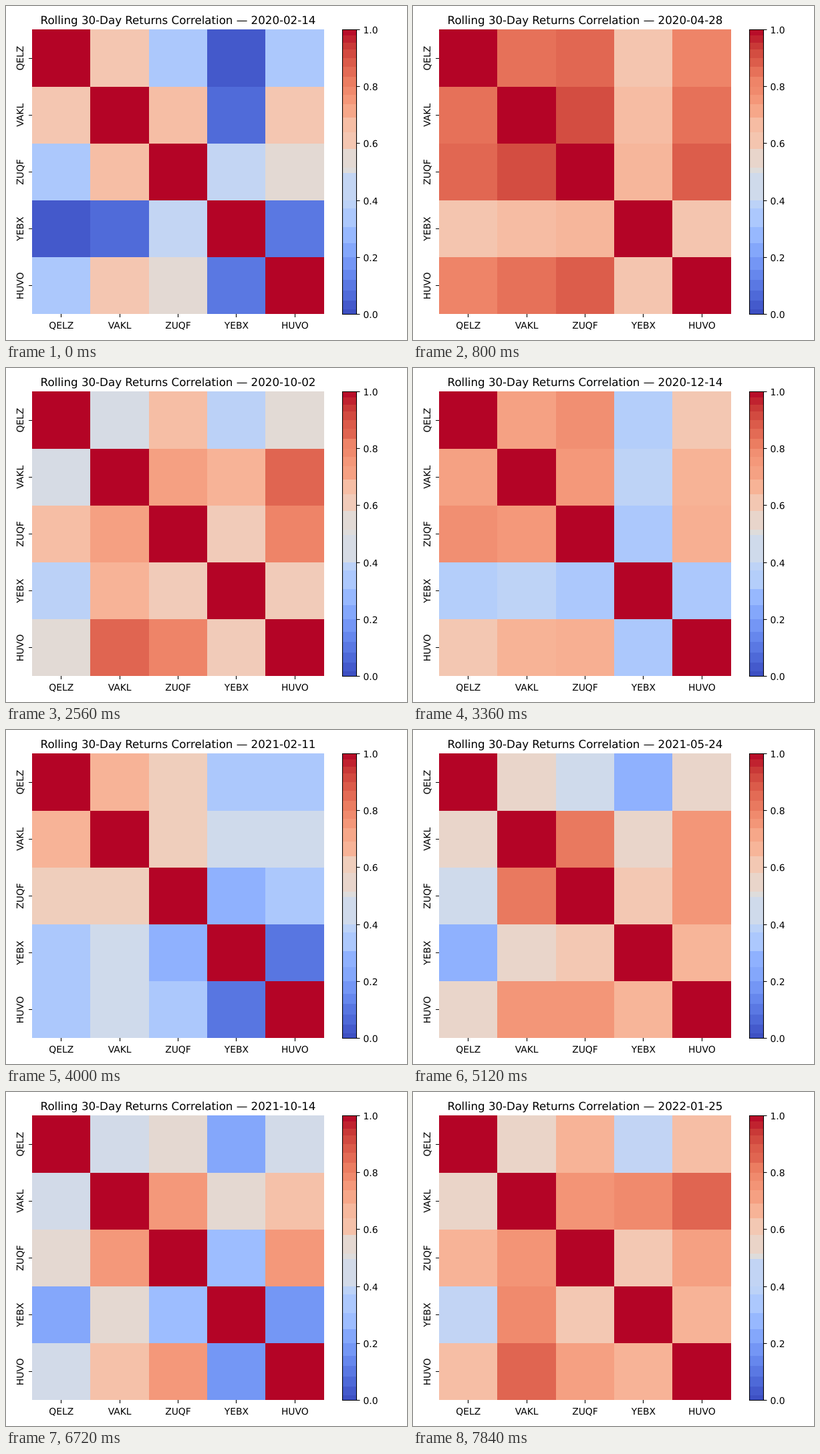
Write an HTML page that moves like this. It is 600 by 500 pixels and loops after 8000 ms.

```html
<!DOCTYPE html>
<html lang="en">
<head>
<title>Rolling correlation heatmap</title>
<style>
  html, body { margin: 0; width: 100%; height: 100%; overflow: hidden; background: #fff; }
  svg { display: block; width: 600px; height: 500px; }
  text { font: 13.89px "DejaVu Sans", sans-serif; text-rendering: geometricPrecision; }
  .title { font-size: 16.67px; }
  .middle { text-anchor: middle; }
  .line { stroke: #000; stroke-width: 1.1; fill: none; }
</style>
</head>
<body>
<svg id="chart" viewBox="0 0 600 500"></svg>
<script>
const STEP_MS = 160, STEPS = 50, DAYS_PER_STEP = 10;
const labels = ["QELZ", "VAKL", "ZUQF", "YEBX", "HUVO"];
const xs = [39, 126, 214, 301, 388, 476];
const ys = [35, 121, 206, 291, 376, 461];

// Blue-grey-red colour map at 17 even stops.
const stops = ("3b4cc0 4d68d7 6282ea 779af7 8db0fe a3c2ff b8d0f9 ccd9ee dddddd " +
  "ecd3c5 f5c4ad f7b194 f4987a ec7f63 de604d cb3e38 b40426").split(" ")
  .map(hex => [0, 2, 4].map(i => parseInt(hex.slice(i, i + 2), 16)));

// Upper triangle of the matrix in percent, row by row, at chosen steps.
const keys = [
  { at: 0,  v: [61.5, 34, 3, 34, 64.5, 7, 61.5, 41, 52.5, 10] },
  { at: 2,  v: [85, 87, 62, 82, 91, 64, 85, 66, 88, 62] },
  { at: 5,  v: [84, 86, 62, 80, 91, 65, 84, 67, 88, 62] },
  { at: 7,  v: [70, 72, 42, 60, 81, 50, 70, 52, 75, 50] },
  { at: 10, v: [72, 59, 44, 59, 87, 44, 67.5, 50, 76.5, 44] },
  { at: 16, v: [47.5, 64.5, 38.5, 52, 73, 68, 86.5, 59.5, 80, 59.5] },
  { at: 20, v: [74, 82, 37, 68, 79, 38, 74, 36, 78, 40] },
  { at: 25, v: [68, 58.5, 34, 34, 58.5, 45, 45, 25.5, 34, 9.5] },
  { at: 28, v: [54, 50, 42, 48, 74, 66, 72, 58, 73, 70] },
  { at: 32, v: [55, 45, 25.5, 55, 82.5, 55, 75.5, 61, 75.5, 67.5] },
  { at: 42, v: [46, 53, 22.5, 46, 75, 53, 63.5, 29.5, 75, 18] },
  { at: 49, v: [55.5, 68, 40.5, 64.5, 76, 78.5, 86.5, 61, 73, 68] }
];

const bandEdges = [0, .017, .047, .083, .12, .155, .2, .25, .305, .372, .4, .495, .515,
  .58, .64, .69, .737, .77, .8, .835, .87, .9, .93, .955, .98, 1];

const holidays = new Set(("2020-02-17 2020-04-10 2020-05-25 2020-07-03 2020-09-07 2020-11-26 " +
  "2020-12-25 2021-01-01 2021-01-18 2021-02-15 2021-04-02 2021-05-31 2021-07-05 2021-09-06 " +
  "2021-11-25 2021-12-24 2022-01-17").split(" "));

const chart = document.getElementById("chart");

function add(tag, attrs, text = "") {
  const node = document.createElementNS(chart.namespaceURI, tag);
  for (const name in attrs) node.setAttribute(name, attrs[name]);
  node.textContent = text;
  return chart.appendChild(node);
}

const box = (x, y, right, bottom) => add("rect", {
  x, y, width: right - x, height: bottom - y, "shape-rendering": "crispEdges"
});
const line = d => add("path", { d, class: "line" });

function colour(value) {
  const pos = value * (stops.length - 1);
  const i = Math.min(Math.floor(pos), stops.length - 2);
  const rgb = stops[i].map((c, k) => Math.round(c + (stops[i + 1][k] - c) * (pos - i)));
  return `rgb(${rgb})`;
}

function tradingDates() {
  const dates = [], day = new Date("2020-02-14T00:00:00Z");
  for (let count = 0; dates.length < STEPS; day.setUTCDate(day.getUTCDate() + 1)) {
    const iso = day.toISOString().slice(0, 10);
    if (day.getUTCDay() % 6 === 0 || holidays.has(iso)) continue;
    if (count++ % DAYS_PER_STEP === 0) dates.push(iso);
  }
  return dates;
}

function valuesAt(step) {
  const next = Math.max(1, keys.findIndex(key => key.at >= step));
  const a = keys[next - 1], b = keys[next];
  const t = (step - a.at) / (b.at - a.at);
  return a.v.map((v, i) => (v + (b.v[i] - v) * t) / 100);
}

const dates = tradingDates();
const title = add("text", { x: 257.5, y: 27, class: "title middle" });

// Each pair of labels owns the two mirrored cells.
const pairs = [];
const cell = (row, col) => box(xs[col], ys[row], xs[col + 1], ys[row + 1]);
labels.forEach((label, i) => {
  cell(i, i).setAttribute("fill", colour(1));
  for (let j = i + 1; j < labels.length; j++) pairs.push([cell(i, j), cell(j, i)]);
});

labels.forEach((label, i) => {
  const x = 39 + 87.4 * (i + .5), y = 35.5 + 85.2 * (i + .5);
  const tickX = Math.floor(x) + .5, tickY = Math.floor(y) + .5;
  line(`M${tickX} 461v5M39 ${tickY}h-5`);
  add("text", { x, y: 483, class: "middle" }, label);
  add("text", { transform: `translate(26 ${y}) rotate(-90)`, class: "middle" }, label);
});

const barY = value => Math.round(461 - 425.5 * value);
const bands = bandEdges.slice(1).map((high, i) => {
  const low = bandEdges[i];
  return { low, high, node: box(504, barY(high), 524, barY(low)) };
});
line("M503.5 35.5H524.5V461.5H503.5Z");
for (let i = 0; i <= 5; i++) {
  const y = Math.round(461 - 85.2 * i) + .5;
  line(`M524.5 ${y}h5`);
  add("text", { x: 534.5, y: y + 5 }, (i / 5).toFixed(1));
}

function draw(step) {
  const values = valuesAt(step);
  title.textContent = `Rolling 30-Day Returns Correlation \u2014 ${dates[step]}`;
  pairs.forEach((nodes, i) => nodes.forEach(n => n.setAttribute("fill", colour(values[i]))));
  // A bar band takes the shade of a cell that falls within it.
  for (const { low, high, node } of bands) {
    const shared = values.find(v => v >= low && v < high);
    node.setAttribute("fill", colour(shared ?? (low + high) / 2));
  }
}

let shown = -1;
const start = performance.now();
function tick() {
  const step = Math.floor((performance.now() - start) / STEP_MS) % STEPS;
  if (step !== shown) draw(shown = step);
  requestAnimationFrame(tick);
}
tick();
</script>
</body>
</html>
```
